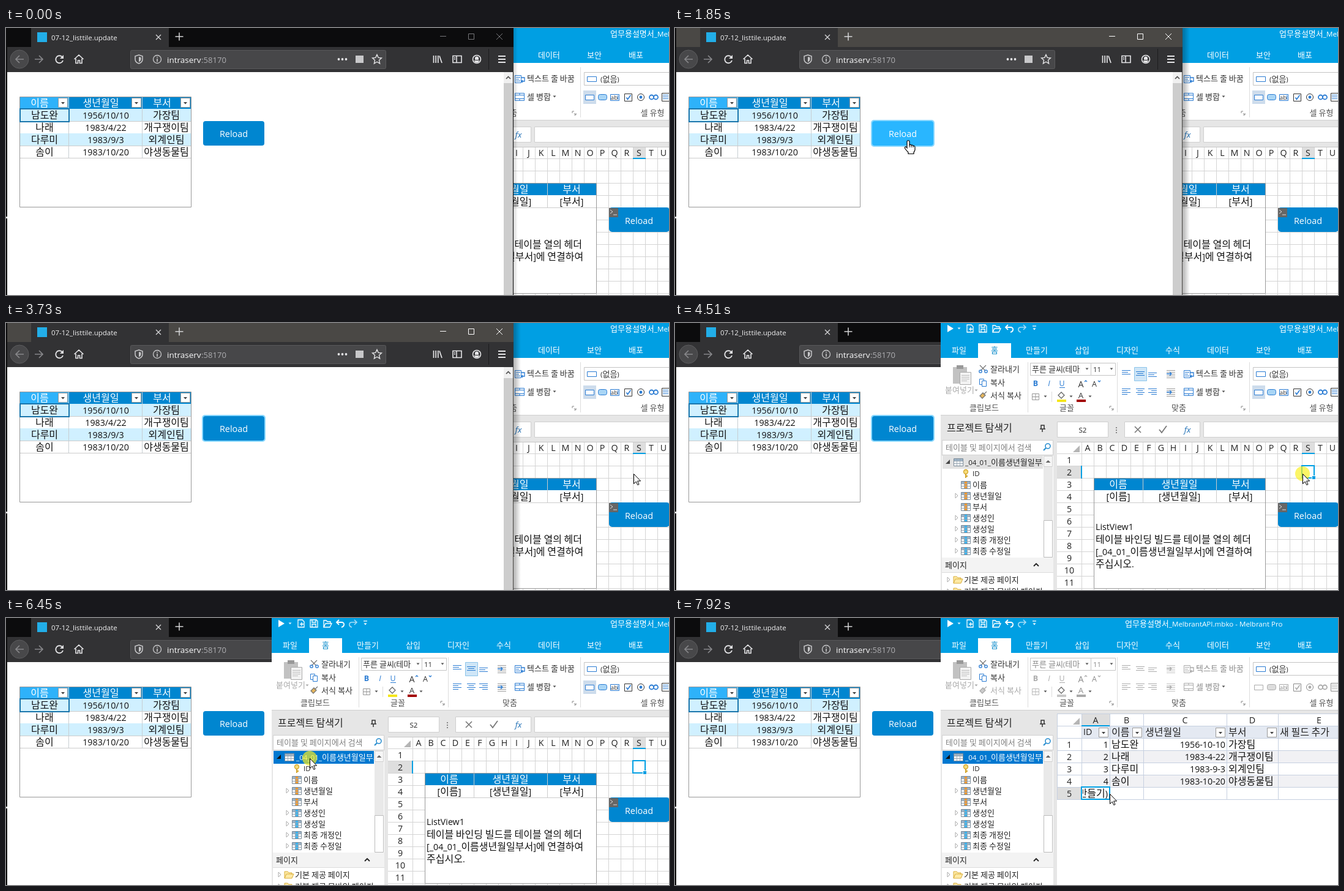
These frames come from a looping animation (1083x436 px, 8 s). An HTML page with a canvas:

```html
<!DOCTYPE html>
<html lang="ko">
<head>
<meta charset="utf-8">
<title>Reload</title>
<style>
html, body { margin: 0; width: 100%; height: 100%; overflow: hidden; background: #fff; }
canvas { display: block; width: 100vw; height: 100vh; }
</style>
</head>
<body>
<canvas id="stage" width="1083" height="436"></canvas>
<script>
const ctx = document.getElementById('stage').getContext('2d');
const LOOP = 8000, BLUE = '#0086d0', SKY = '#009fe3', GRID = '#d4d4d4';
const LATIN = '"Open Sans", "Noto Sans", sans-serif';
const HANGUL = '"Noto Sans CJK KR", "Noto Sans CJK", sans-serif';
const people = [
  ['남도완', [1956, 10, 10], '가장팀'],
  ['나래', [1983, 4, 22], '개구쟁이팀'],
  ['다루미', [1983, 9, 3], '외계인팀'],
  ['솜이', [1983, 10, 20], '야생동물팀']
];

// --- drawing helpers ---
function box(x, y, w, h, fill, stroke, r = 0) {
  ctx.beginPath();
  if (stroke) ctx.roundRect(x + .5, y + .5, w - 1, h - 1, r);
  else ctx.roundRect(x, y, w, h, r);
  if (fill) { ctx.fillStyle = fill; ctx.fill(); }
  if (stroke) { ctx.strokeStyle = stroke; ctx.lineWidth = 1; ctx.stroke(); }
}
const hline = (x, y, w, c, h = 1) => box(x, y, w, h, c);
const vline = (x, y, h, c, w = 1) => box(x, y, w, h, c);

function outline(x, y, w, h, c) {
  ctx.strokeStyle = c;
  ctx.lineWidth = 2;
  ctx.strokeRect(x, y, w, h);
}
function path(x, y, d, stroke, fill, w = 1.3) {
  const p = new Path2D(d);
  ctx.save();
  ctx.translate(x, y);
  if (fill) { ctx.fillStyle = fill; ctx.fill(p); }
  if (stroke) { ctx.strokeStyle = stroke; ctx.lineWidth = w; ctx.stroke(p); }
  ctx.restore();
}
function dot(x, y, r, fill, stroke, w = 1.3) {
  ctx.beginPath();
  ctx.arc(x, y, r, 0, 7);
  if (fill) { ctx.fillStyle = fill; ctx.fill(); }
  if (stroke) { ctx.strokeStyle = stroke; ctx.lineWidth = w; ctx.stroke(); }
}
const caret = (x, y, c = '#555') => path(x, y, 'M-2.5-1.5H2.5L0 1.5Z', null, c);

// Hangul and Latin runs use different fonts and sizes; y is the visual middle.
function text(s, x, y, size = 13, color = '#333', align = 'left', weight = '') {
  s = String(s);
  const runs = s.match(/[가-힣]+|[^가-힣]+/g).map(run => {
    const font = /[가-힣]/.test(run) ? `${weight} ${size}px ${HANGUL}` : `${weight} ${size * .89}px ${LATIN}`;
    ctx.font = font;
    return { run, font, w: ctx.measureText(run).width };
  });
  const total = runs.reduce((sum, r) => sum + r.w, 0);
  const drop = size * (/[가-힣]/.test(s) ? .36 : .32);
  x -= align === 'center' ? total / 2 : align === 'right' ? total : 0;
  ctx.fillStyle = color;
  for (const r of runs) {
    ctx.font = r.font;
    ctx.fillText(r.run, x, y + drop);
    x += r.w;
  }
}
const mid = (s, x, y, size, color) => text(s, x, y, size, color, 'center');

function clipped(x, y, w, h, draw) {
  ctx.save();
  ctx.beginPath();
  ctx.rect(x, y, w, h);
  ctx.clip();
  draw();
  ctx.restore();
}
function filterButton(x, y) {
  box(x, y, 16, 16, '#fff', '#999');
  path(x + 8, y + 8.5, 'M-3-1.5H3L0 2Z', null, '#444');
}

// --- browser window ---
function browser(t, hover) {
  const active = t >= 1620 && t < 4510;
  const ring = t >= 1697 && t < 4580;
  const lit = '#e4e4e6', dim = '#87878a', chrome = active ? '#4a4845' : '#0c0c0d';
  if (t < 4510) {
    const reach = active ? 12 : 7;
    const g = ctx.createLinearGradient(829, 0, 829 + reach, 0);
    g.addColorStop(0, active ? 'rgba(0,0,0,.3)' : 'rgba(0,0,0,.16)');
    g.addColorStop(1, 'rgba(0,0,0,0)');
    ctx.fillStyle = g;
    ctx.fillRect(829, 0, reach, 436);
  }
  box(0, 0, 829, 436, chrome);
  box(0, 0, 2, 436, '#0c0c0d');
  box(41, 0, 225, 32, '#323234');
  box(2, 31, 827, 41, '#323234');
  box(51, 7, 16, 16, '#22aee8');
  text('07-12_listtile.update', 74, 15.5, 12.9, '#f0f0f1');
  path(249, 15, 'M-4-4L4 4M4-4L-4 4', '#d6d6d8');
  path(283, 14, 'M-6.5 0H6.5M0-6.5V6.5', '#d6d6d8', null, 1.5);

  const ctl = active ? '#fff' : '#78787b';
  path(714, 13.5, 'M-5 0H5', ctl, null, 1);
  path(760, 14, 'M-4.5-4.5H4.5V4.5H-4.5Z', ctl, null, 1);
  path(806, 14, 'M-5-5L5 5M5-5L-5 5', ctl, null, 1);

  dot(22, 51, 15, '#48484a', '#5c5c5e', 1);
  path(22, 51, 'M7 0H-6M0-6L-6 0L0 6', dim, null, 1.7);
  path(54, 51, 'M-7 0H6M0-6L6 0L0 6', dim, null, 1.7);
  path(87, 51, 'M4.5-4A6 6 0 1 0 6 2', lit, null, 1.8);
  path(87, 51, 'M7-7V-1H1Z', null, lit);
  path(119, 51, 'M-7.5 0L0-7L7.5 0M-5-1V6.5H-1.5V2H1.5V6.5H5V-1', lit, null, 1.6);

  box(203, 36, 418, 31, '#474749', '#59595b', 2);
  path(217, 51, 'M0-7L6-5V0C6 4 3 6 0 7C-3 6-6 4-6 0V-5Z', '#c8c8ca', null, 1.5);
  path(217, 51, 'M0-4L3.5-3V0C3.5 2 2 3.5 0 4.5Z', null, '#c8c8ca');
  dot(247, 51, 6.5, null, '#c8c8ca');
  path(247, 51, 'M0-1V4M0-4V-2.5', '#c8c8ca', null, 1.6);
  text('intraserv', 263, 52, 15.2, '#f9f9fa');
  text(':58170', 319, 52, 14.7, '#adadb0');
  for (const x of [543.5, 549.5, 555.5]) dot(x, 51, 1.9, lit);
  box(571, 45, 13, 12, '#c8c8ca');
  path(606, 51, 'M0-7.5L2.2-2.6L7.5-2L3.5 1.6L4.6 7L0 4.2L-4.6 7L-3.5 1.6L-7.5-2L-2.2-2.6Z', lit, null, 1.4);
  path(705, 51, 'M-6.5-6V6M-2.8-6V6M.8-6V6M3-5.5L7 6', lit, null, 1.7);
  path(737, 51, 'M-7-5.5H7V5.5H-7ZM-1-5V5M-5-2.5H-3M-5 0H-3', lit, null, 1.6);
  dot(769, 51, 6.5, null, lit, 1.6);
  path(769, 51, 'M-3-1.5A3 3 0 0 1 3-1.5V1H-3ZM-4.5 2H4.5L2 5.5H-2Z', null, lit);
  vline(788, 34, 34, '#1c1c1e');
  path(810, 51, 'M-6-5H6M-6 0H6M-6 5H6', lit, null, 1.8);

  box(2, 72, 826, 364, '#fff');
  box(813, 72, 15, 364, '#f0f0f0');
  box(813, 90, 15, 346, '#cdcdcd');
  path(820.5, 81, 'M-3.5 2L0-1.5L3.5 2', '#505050', null, 1.7);
  box(0, 308, 2, 3, '#ddd');

  listView();
  if (ring) box(320, 150, 104, 44, '#8ad8ff', null, 5);
  box(322, 152, 100, 40, hover ? '#29b6ff' : BLUE, null, 4);
  mid('Reload', 372, 173, 16.2, '#fff');
}

function listView() {
  const cols = [[23, 80, 55, 63], [103, 120, 155, 163], [223, 79, 255, 262]];
  box(22, 112, 281, 181, '#fff', '#999');
  cols.forEach(([x, w, cx], i) => {
    box(x, 113, w, 19, i ? BLUE : '#2eb2fa');
    mid(['이름', '생년월일', '부서'][i], cx, 122, 16, '#fff');
    filterButton([85, 205, 285][i], 114);
  });
  people.forEach(([name, date, team], i) => {
    const y = 132 + i * 20;
    if (i % 2 === 0) box(23, y, 279, 20, '#d0f0ff');
    hline(23, y + 20, 279, '#ccc');
    mid(name, 63, y + 10, 16, '#111');
    mid(date.join('/'), 163, y + 10.5, 16, '#111');
    mid(team, 262, y + 10, 16, '#111');
  });
  for (const x of [102, 222]) vline(x, 113, 99, '#c6cdd2');
  outline(23, 132, 80, 21, '#1b76ac');
}

// --- designer window ---
function designer(t) {
  const table = t >= 6510;
  box(434, 0, 649, 436, '#e6e6e6');
  titleBar(table);
  ribbon(table);
  explorer(t);
  clipped(624, 151, 459, 285, () => table ? dataSheet() : pageSheet(t));
}

function titleBar(table) {
  box(434, 0, 649, 57, SKY);
  path(449, 9, 'M-4-6L6 0L-4 6Z', null, '#fff');
  caret(464, 9, '#d8f2ff');
  path(482, 9, 'M-5-6H2L5-3V6H-5ZM-2 1H4M1-2V4', '#fff');
  path(503, 9, 'M-6-6H4L6-4V6H-6ZM-3-6V-2H3V-6M-3 6V1H3V6', '#fff');
  path(525, 9, 'M-6 6V-5H-2L0-3H5V0M-6 6L-3 0H7L4 6Z', '#fff');
  path(546, 9, 'M-2-6L-6-2L-2 2M-6-2H2C8-2 7 5 2 6', '#fff', null, 1.8);
  path(567, 9, 'M2-6L6-2L2 2M6-2H-2C-8-2-7 5-2 6', '#a9def7', null, 1.6);
  path(587, 8, 'M-3-3H3', '#fff');
  caret(587, 10, '#fff');
  text('업무용설명서_MelbrantAPI.mbko - Melbrant Pro', table ? 735 : 987, 9, 13, '#fff');
  box(495, 33, 54, 25, '#fff');
  const tabs = ['파일', '홈', '만들기', '삽입', '디자인', '수식', '데이터', '보안', '배포'];
  const at = [464, 522, 591, 665, 739, 813, 887, 961, 1029];
  tabs.forEach((s, i) => mid(s, at[i], 44, 13, i === 1 ? '#0086c8' : '#fff'));
}

function lines(x, y, widths, c, align = 0) {
  widths.forEach((w, i) => hline(x + (14 - w) * align, y + i * 3, w, c));
}

function ribbon(off) {
  const ink = off ? '#ababab' : '#2b7cd3', body = off ? '#8b8b8b' : '#333';
  box(434, 57, 649, 94, '#fff');
  hline(434, 150, 649, '#cfcfcf');
  for (const x of [576, 722, 938]) vline(x, 64, 82, '#dcdcdc');

  path(467, 84, 'M-13-12H10V15H-13Z', null, '#c2c2c2');
  path(467, 72, 'M-7-3H4V3H-7Z', null, '#999');
  box(465, 80, 19, 21, '#f3f3f3', '#aaa');
  lines(468, 85, [13, 13, 13, 9], '#bbb');
  mid('붙여넣기', 465, 109, 13, '#aaa');
  caret(492, 110, '#aaa');
  path(503, 75, 'M-5-6L4 3M5-6L-4 3', '#777');
  dot(499, 79, 2.2, null, '#2b7cd3');
  dot(508, 79, 2.2, null, '#2b7cd3');
  text('잘라내기', 515, 75, 13);
  box(497, 91, 8, 10, '#fff', '#2b7cd3');
  box(501, 94, 8, 10, '#fff', '#2b7cd3');
  text('복사', 515, 97, 13);
  path(503, 118, 'M6-6L1-1M-5 1L0-4L4 0L-1 5Z', off ? '#aaa' : '#777', off ? '#ccc' : '#e8b75b');
  text('서식 복사', 515, 118, 13, off ? '#aaa' : '#333');
  mid('클립보드', 505, 138, 13, '#555');

  box(580, 65, 100, 21, '#fff', '#c4c4c4');
  text('푸른 글씨(테마', 583, 75, 13, body);
  caret(673, 75);
  box(679, 65, 41, 21, '#fff', '#c4c4c4');
  text('11', 683, 75.5, 13, body);
  caret(713, 75);
  text('B', 589, 99, 14, ink, 'center', 'bold');
  text('I', 611, 99, 14, ink, 'center', 'italic');
  mid('U', 632, 98.5, 14, ink);
  hline(628, 105, 9, ink);
  [[663, 16, -1], [685, 14, 1]].forEach(([x, size, dir]) => {
    mid('A', x, 99.5, size, body);
    path(x + 8, 95, `M-2 ${-dir}L0 ${dir}L2 ${-dir}`, ink);
  });
  box(583, 115, 12, 11, null, off ? '#bbb' : '#999');
  path(589, 120.5, 'M0-5V5M-5 0H5', off ? '#bbb' : '#999', null, 1);
  caret(605, 120);
  vline(615, 112, 17, '#ddd');
  path(631, 118, 'M-5 0L0-5L5 0L0 5Z', '#666', '#fff');
  box(624, 125, 15, 4, off ? '#c8c8c8' : '#f5e61c');
  caret(647, 120);
  mid('A', 663, 118.5, 15, body);
  box(656, 125, 15, 4, off ? '#a9a9a9' : '#a30000');
  caret(678, 120);
  mid('글꼴', 640, 138, 13, '#555');

  if (!off) box(750, 72, 21, 23, '#cfe6f7', '#8cc4ea');
  [730, 753, 773].forEach((x, i) => {
    lines(x, 77 + i * 2, [14, 10, 14], ink, i === 1 ? .5 : 0);
    lines(x, 107, [14, 9, 14, 9], ink, i / 2);
  });
  for (const y of [83, 113]) {
    lines(803, y - 6, [14, 14, 14, 14, 14], off ? '#c4c4c4' : '#999');
    path(807, y, 'M-4 0H4M1-3L4 0L1 3', ink);
  }
  box(831, 77, 11, 13, '#fff', ink);
  lines(833, 80, [7, 5, 7], ink);
  path(843, 85, 'M-2-4H4V2H-1M1 0L-1 2L1 4', ink);
  text('텍스트 줄 바꿈', 851, 82, 13, body);
  box(831, 106, 16, 13, '#fff', ink);
  path(839, 112.5, 'M-8-3H8M-8 3H8M0-6V-3M0 3V6', ink, null, 1);
  text('셀 병합', 851, 112, 13, body);
  caret(896, 112);
  mid('맞춤', 823, 138, 13, '#555');
  for (const x of [713, 928]) path(x, 139, 'M-3 0V-3H0M0 0L3 3M3 0V3H0', '#888', null, 1);

  box(944, 72, 145, 22, '#fff', '#c4c4c4');
  box(949, 79, 16, 9, '#fff', '#2b7cd3');
  text('(없음)', 971, 83, 13);
  if (!off) box(943, 102, 21, 22, '#cddcec');
  box(946, 109, 15, 9, '#fff', ink);
  box(967, 108, 15, 10, off ? '#ddd' : '#a9d5f5', ink, 3);
  box(987, 108, 15, 11, '#fff', ink);
  mid('ab', 993.5, 113, 11, body);
  vline(999, 110, 7, ink);
  box(1010, 107, 13, 13, '#fff', body);
  path(1016.5, 113.5, 'M-3 0L-1 3L4-4', ink, null, 1.6);
  dot(1037, 113, 5.5, '#fff', body, 1);
  dot(1037, 113, 2.4, ink);
  dot(1054.5, 113, 3.5, null, ink, 1.8);
  dot(1061.5, 113, 3.5, null, ink, 1.8);
  box(1071, 106, 14, 14, '#fff', body);
  lines(1073, 109, [9, 9, 9], ink);
  mid('셀 유형', 1056, 138, 13, '#555');
}

function tableIcon(x, y, c) {
  box(x - 8, y - 6, 16, 13, '#fff', '#7a8a98');
  box(x - 7, y - 5, 14, 3, '#9db4c8');
  if (c) box(x - 3, y - 5, 6, 11, c);
  for (const dx of [-3, 2]) vline(x + dx, y - 5, 11, '#9aa8b4');
  for (const dy of [-2, 2]) hline(x - 7, y + dy, 14, '#9aa8b4');
}
const expander = (x, y) => path(x, y, 'M-2-4L2 0L-2 4Z', '#aaa', '#fff', 1);

function explorer(t) {
  text('프로젝트 탐색기', 444, 171, 16, '#222');
  path(600, 172, 'M-2-5H3V1H-2ZM-4 1H5M0 1V6', '#333', null, 1.5);
  box(436, 191, 182, 25, '#fff', '#cfcfcf');
  text('테이블 및 페이지에서 검색', 442, 203, 13, '#808080');
  dot(609, 201, 4, null, '#2b8fd0', 1.6);
  path(606, 204, 'M0 0L-4 4', '#2b8fd0', null, 2.2);

  box(436, 217, 182, 219, '#fff');
  const picked = t >= 6220;
  box(437, 217, 164, 21, picked ? '#0078d0' : '#e2e2e2');
  path(446, 227, 'M3-4V3H-4Z', null, picked ? '#111' : '#444');
  tableIcon(463, 227);
  clipped(437, 217, 164, 21, () => text('_04_01_이름생년월일부서', 474, 227, 13, picked ? '#fff' : '#222'));

  const fields = ['ID', '이름', '생년월일', '부서', '생성인', '생성일', '최종 개정인', '최종 수정일'];
  fields.forEach((s, i) => {
    const y = 246 + i * 18;
    if (i === 0) {
      dot(475, y - 3, 3.5, '#f7dc7a', '#d2a52a');
      path(475, y, 'M0 0V7M0 4H3', '#d2a52a', null, 2);
    } else tableIcon(475, y, i < 4 ? '#f09a34' : '#3fb4ee');
    if (i === 2 || i > 3) expander(460, y);
    text(s, 486, y, 13, '#222');
  });
  box(602, 217, 15, 166, '#e9e9e9');
  box(602, 217, 15, 18, '#f6f6f6', '#d0d0d0');
  path(609.5, 226, 'M-4 2L0-2L4 2Z', null, '#666');
  box(602, 322, 15, 61, '#fff', '#bcbcbc');

  box(436, 383, 182, 24, '#f3f3f3');
  hline(436, 407, 182, '#ddd');
  text('페이지', 441, 395, 13, '#222');
  path(590, 395, 'M-4 2L0-2L4 2', '#222', null, 1.8);
  ['기본 제공 페이지', '기본 제공 모바일 페이지'].forEach((s, i) => {
    const y = 419 + i * 19;
    expander(447, y);
    path(462, y, 'M-7 6V-5H-2L0-3H5V0M-7 6L-4-1H8L5 6Z', '#d9ae3c', '#fde9a4', 1);
    text(s, 472, y, 13, '#222');
  });
}

function pageSheet(t) {
  box(624, 161, 84, 26, '#fff', '#cfcfcf');
  mid('S2', 666, 174.5, 13, '#222');
  for (const y of [170, 174, 178]) box(720, y, 2, 2, '#888');
  box(734, 161, 124, 26, '#fff', '#cfcfcf');
  path(756, 174, 'M-5-5L5 5M5-5L-5 5', '#777', null, 1.6);
  path(797, 174, 'M-6 0L-2 5L6-6', '#777', null, 1.8);
  text('fx', 837, 174, 15, '#1f6fb5', 'center', 'italic');
  box(863, 161, 230, 26, '#fff', '#cfcfcf');

  box(624, 194, 459, 242, '#fff');
  box(1024, 194, 20, 19, '#dedede');
  box(624, 233, 40, 20, '#dedede');
  path(661, 211, 'M0 0V-11L-11 0Z', null, '#b5b5b5');
  for (let i = 0; i < 21; i++) {
    const x = 664 + i * 20;
    vline(x, 194, 242, GRID);
    mid(String.fromCharCode(65 + i), x + 10, 204, 16, '#222');
  }
  for (let i = 0; i < 12; i++) {
    hline(624, 213 + i * 20, 459, GRID);
    if (i < 11) mid(i + 1, 644, 223.5 + i * 20, 16, '#222');
  }
  hline(624, 194, 459, '#c8c8c8');
  hline(1024, 212, 21, SKY, 2);
  vline(663, 233, 21, SKY, 2);

  box(684, 253, 281, 181, '#fff', '#999');
  box(685, 254, 279, 19, BLUE);
  [['이름', 724], ['생년월일', 824], ['부서', 924]].forEach(([s, x]) => {
    mid(s, x, 263, 16, '#fff');
    mid(`[${s}]`, x, 283, 16, '#111');
  });
  for (const x of [764, 884]) vline(x, 254, 39, '#ccc');
  hline(685, 293, 279, '#ccc');
  ctx.wordSpacing = '4.5px';
  ['ListView1', '테이블 바인딩 빌드를 테이블 열의 헤더', '[_04_01_이름생년월일부서]에 연결하여', '주십시오.']
    .forEach((s, i) => text(s, 687, 333 + i * 20, 16, '#111'));
  ctx.wordSpacing = '0px';

  box(985, 293, 99, 40, BLUE, null, 5);
  box(985, 294, 15, 15, '#666');
  path(992, 301, 'M-5-4L-1-1L-5 2M0 4H6', '#ddd', null, 1);
  mid('Reload', 1034, 315, 16.2, '#fff');

  if (t >= 4510) {
    outline(1024, 233, 20, 20, SKY);
    box(1040, 249, 7, 7, '#fff');
    box(1041, 250, 5, 5, SKY);
  }
}

function dataSheet() {
  const edge = '#c6d0e0', xs = [664, 710, 765, 901, 985, 1119];
  const heads = ['ID', '이름', '생년월일', '부서', '새 필드 추가'];
  box(624, 156, 459, 280, '#fff');
  box(664, 156, 46, 21, '#dedede');
  box(664, 177, 419, 19, '#e4e9f2');
  for (const i of [1, 3]) box(664, 196 + i * 20, 419, 20, '#f1f1f4');
  box(624, 276, 40, 20, '#dedede');
  path(661, 174, 'M0 0V-11L-11 0Z', null, '#b5b5b5');
  xs.forEach((x, i) => {
    vline(x, 156, 141, edge);
    if (i > 4) return;
    mid('ABCDE'[i], (x + xs[i + 1]) / 2, 167, 16, '#222');
    text(heads[i], x + 3, 186, 16, '#222');
    if (i < 4) filterButton(xs[i + 1] - 18, 179);
  });
  for (const y of [156, 176, 196, 216, 236, 256, 276, 296]) hline(624, y, 459, edge);
  vline(624, 156, 141, edge);
  for (let i = 0; i < 5; i++) mid(i + 1, 644, 206.5 + i * 20, 16, '#222');
  people.forEach(([name, date, team], i) => {
    const y = 206 + i * 20;
    text(i + 1, 708, y + .5, 16, '#111', 'right');
    text(name, 713, y, 16, '#111');
    text(date.join('-'), 899, y + .5, 16, '#111', 'right');
    text(team, 904, y, 16, '#111');
  });
  hline(664, 175, 46, SKY, 2);
  vline(663, 276, 21, SKY, 2);
  clipped(666, 277, 43, 19, () => text('(만들기)', 707, 286, 16, '#111', 'right'));
  outline(664, 276, 46, 20, SKY);
}

// --- pointer ---
const easeOut = p => 1 - (1 - p) ** 2;
const easeBoth = p => p * p * (3 - 2 * p);
// Each move runs along a quadratic curve in a fixed number of steps.
const moves = [
  { from: 930, to: 1470, steps: 8, ease: easeOut, pts: [[585, 499], [483, 341], [381, 184]] },
  { from: 3100, to: 3730, steps: 9, ease: easeBoth, pts: [[381, 184], [703, 320], [1025, 246]] },
  { from: 5130, to: 5820, steps: 10, ease: easeBoth, pts: [[1025, 246], [760, 147], [496, 229]] },
  { from: 7690, to: 7920, steps: 4, ease: easeBoth, pts: [[496, 229], [603, 258], [710, 287]] }
];
const clicks = [[1620, 1773], [4510, 4670], [6220, 6300], [6450, 6590]];

function pointer(t) {
  const m = moves.filter(m => t >= m.from).pop();
  if (!m) return null;
  const step = Math.floor((t - m.from) / (m.to - m.from) * (m.steps - 1) + 1e-6);
  const p = m.ease(Math.min(m.steps, step + 1) / m.steps), q = 1 - p;
  const [a, b, c] = m.pts;
  return [0, 1].map(i => Math.round(q * q * a[i] + 2 * p * q * b[i] + p * p * c[i]));
}

function drawPointer(t, [x, y], hand) {
  if (clicks.some(([a, b]) => t >= a && t < b)) dot(x, y, 12, 'rgba(250,240,30,.68)');
  if (hand) {
    path(x, y, 'M-2 12V1Q0-1.5 2 1V7Q4 5.5 5 7.5Q7 6.5 8 8.5Q11 8 11 11V15Q10 18 9 19V21.5H0V19Q-3 16-5.5 12.5Q-6 9.5-3.5 10Z',
      '#000', '#fff', 1.2);
    path(x, y, 'M2 7V11M5 8V11M8 9V11', '#000', null, 1);
  } else {
    path(x, y, 'M.5.5V16.5L4.2 13L6.8 18.5L9 17.5L6.6 12H11.6Z', '#000', '#fff', 1);
  }
}

const start = performance.now();
function frame() {
  const t = (performance.now() - start) % LOOP;
  const pos = pointer(t);
  const hover = !!pos && t < 4510 && pos[0] >= 322 && pos[0] < 422 && pos[1] >= 152 && pos[1] < 192;
  ctx.clearRect(0, 0, 1083, 436);
  if (t < 4510) { designer(t); browser(t, hover); }
  else { browser(t, hover); designer(t); }
  if (pos) drawPointer(t, pos, hover);
  requestAnimationFrame(frame);
}
frame();
</script>
</body>
</html>
```
